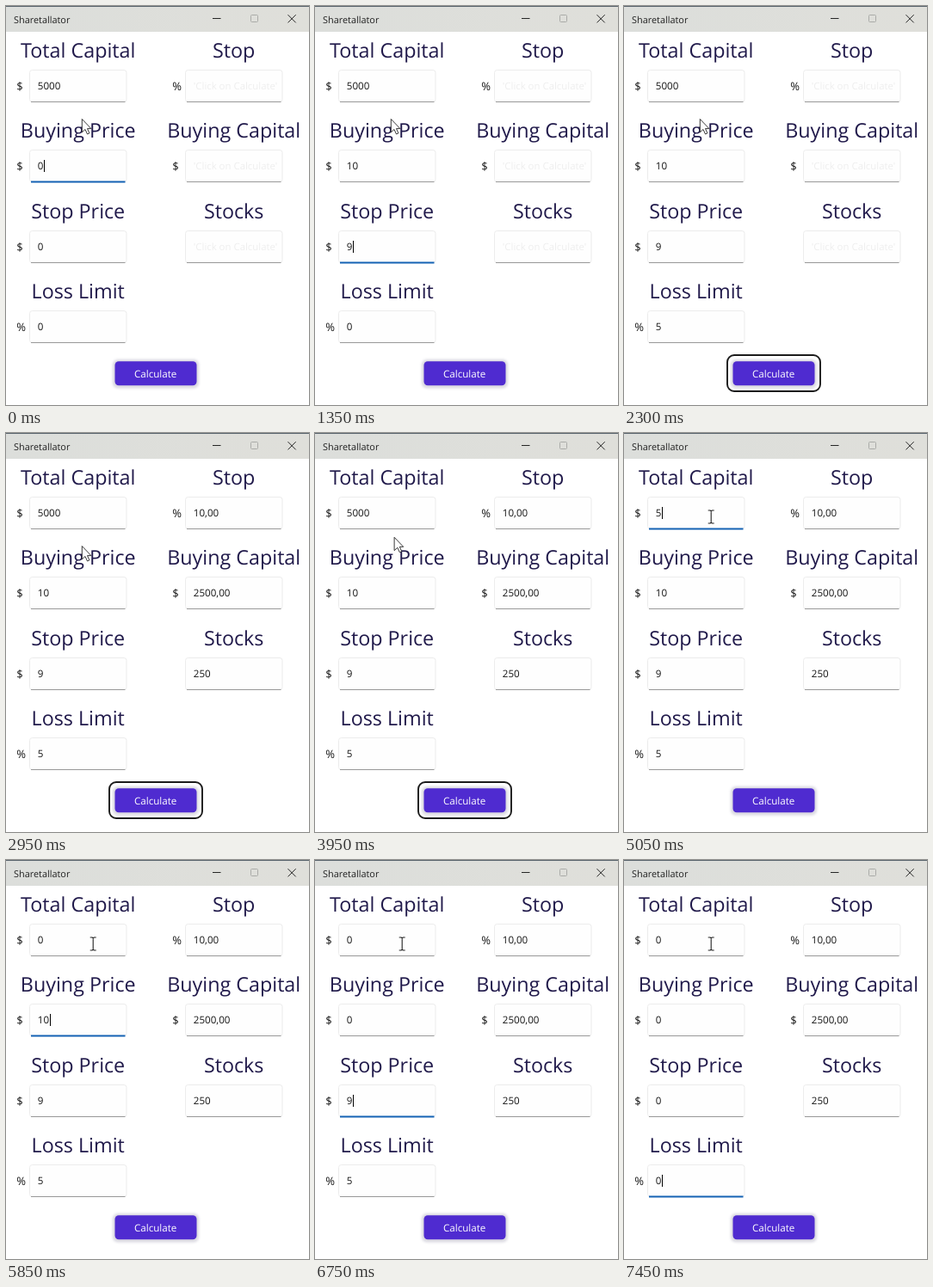
Recreate the animation shown at these times as an HTML page. Size 352x464 px, loop 8000 ms.

```html
<!DOCTYPE html>
<html lang="en">
<head>
<meta charset="utf-8">
<title>Sharetallator</title>
<style>
  html, body { margin: 0; width: 100%; height: 100%; overflow: hidden; background: #fff; }
  svg { display: block; width: 352px; height: 464px; font-family: "Open Sans", "Noto Sans", sans-serif; }
  text { text-rendering: geometricPrecision; }
  .head { font-size: 23.3px; fill: #211a4b; text-anchor: middle; }
  .unit { font-size: 13.1px; fill: #161616; }
  .value { font-size: 11.6px; fill: #161616; }
  .hint { font-size: 11.4px; fill: #eee; }
  .box { fill: #fefefe; stroke: #ececec; }
  .edge { fill: none; stroke: #989898; }
  .edge.on { stroke: #1462b4; stroke-width: 2; }
  .halo { fill: #d9d8e0; filter: blur(1.5px); }
</style>
</head>
<body>
<svg id="stage" viewBox="0 0 352 464">
  <defs>
    <linearGradient id="bar">
      <stop offset="0" stop-color="#dcdedb"/>
      <stop offset="1" stop-color="#dfdfda"/>
    </linearGradient>
  </defs>
  <rect width="352" height="464" fill="#fff"/>
  <rect width="352" height="30" fill="url(#bar)"/>
  <rect width="352" height="1" fill="#59646d"/>
  <text x="9" y="19.5" font-size="10.9" fill="#222">Sharetallator</text>
  <g fill="none" stroke="#252525">
    <path d="M240 14.5h9.5"/>
    <rect x="284.5" y="10.5" width="8" height="8" rx="1" stroke="#aaaba8"/>
    <path d="M327.5 10.2l9.2 9.2m0-9.2l-9.2 9.2"/>
  </g>
  <g id="form"></g>
  <rect class="halo" x="124" y="411" width="100" height="33.5" rx="6"/>
  <rect x="126.5" y="413.2" width="95" height="28" rx="4.5" fill="#4f2bd0"/>
  <text x="173.7" y="432" font-size="11.6" fill="#fff" text-anchor="middle">Calculate</text>
  <rect id="ring" x="120" y="406" width="108" height="42" rx="8" fill="none" stroke="#1b1b1b" stroke-width="1.9"/>
  <rect id="caret" width="1" height="14" fill="#000"/>
  <g id="pointer">
    <path id="arrow" d="M0 0V15.4L3.7 12 6.2 17.5 8.6 16.4 6.2 11.1H10.6Z" fill="#fff" stroke="#222" stroke-width=".9"/>
    <path id="beam" d="M-3.5-7h2.5l1 1 1-1h2.5M0-6v13M-3.5 8h2.5l1-1 1 1h2.5" fill="none" stroke="#222" stroke-width="1.1"/>
  </g>
</svg>
<script>
const LOOP = 8000, BUTTON = 4, CLICK = 4350, DONE = 2850;
const $ = id => document.getElementById(id);
const tops = [74.5, 167.5, 261.5, 354.5];

// Each track is a list of [start time, value].
const focusTrack = [[0, 1], [1050, 2], [1650, 3], [2300, BUTTON], [CLICK, 0], [5850, 1], [6750, 2], [7250, 3]];
const inputs = [
  ["Total Capital", "$", [[0, "5000"], [4800, "500"], [4950, "50"], [5050, "5"], [5350, "0"]]],
  ["Buying Price", "$", [[0, "0"], [450, "1"], [800, "10"], [6250, "1"], [6500, "0"]]],
  ["Stop Price", "$", [[0, "0"], [1350, "9"], [7000, "0"]]],
  ["Loss Limit", "%", [[0, "0"], [1800, "5"], [7450, "0"]]]
];
const results = [["Stop", "%", "10,00"], ["Buying Capital", "$", "2500,00"], ["Stocks", "", "250"]];

function add(tag, attrs, text = "") {
  const el = document.createElementNS("http://www.w3.org/2000/svg", tag);
  for (const key in attrs) el.setAttribute(key, attrs[key]);
  el.textContent = text;
  return $("form").appendChild(el);
}

function addField(x, row, head, unit) {
  const y = tops[row];
  add("text", { class: "head", x: x + 56.7, y: y - 14.5 }, head);
  add("text", { class: "unit", x: x - 14.8, y: y + 23.7 }, unit);
  add("rect", { class: "box", x: x + .5, y, width: 112.5, height: 37, rx: 3 });
  const edge = add("path", { class: "edge", d: `M${x + 2} ${y + 37}h109.5` });
  const value = add("text", { class: "value", x: x + 9.8, y: y + 22.4 });
  return { edge, value };
}

const entries = inputs.map(([head, unit, track], i) => ({ ...addField(27, i, head, unit), track }));
const outputs = results.map(([head, unit, text], i) => ({ ...addField(208, i, head, unit), text }));

function at(track, t) {
  let value = track[0][1];
  for (const [start, next] of track) if (t >= start) value = next;
  return value;
}

function setText(el, text) {
  if (el.textContent !== text) el.textContent = text;
}

function movePointer(t) {
  const u = Math.min(1, Math.max(0, (t - 3730) / 610));
  const p = u * u * (3 - 2 * u);
  const x = 88.3 + 12.9 * p, y = 131.5 - 34.5 * p;
  const over = y < 112;
  $("pointer").setAttribute("transform", `translate(${x} ${y})`);
  $("arrow").style.display = over ? "none" : "";
  $("beam").style.display = over ? "" : "none";
}

function draw(now) {
  const t = now % LOOP;
  const focus = at(focusTrack, t);
  entries.forEach(({ edge, value, track }, i) => {
    setText(value, at(track, t));
    edge.classList.toggle("on", i === focus);
  });
  outputs.forEach(({ value, text }) => {
    const done = t >= DONE;
    setText(value, done ? text : "'Click on Calculate'");
    value.setAttribute("class", done ? "value" : "hint");
  });

  const onButton = focus === BUTTON;
  $("ring").style.display = onButton ? "" : "none";
  $("caret").style.display = onButton ? "none" : "";
  if (!onButton) {
    const end = 37.3 + entries[focus].value.getComputedTextLength();
    $("caret").setAttribute("x", Math.round(end));
    $("caret").setAttribute("y", tops[focus] + 11.5);
  }
  movePointer(t);
}

let begin;
function tick(now) {
  begin ??= now;
  draw(now - begin);
  requestAnimationFrame(tick);
}
draw(0);
requestAnimationFrame(tick);
</script>
</body>
</html>
```
